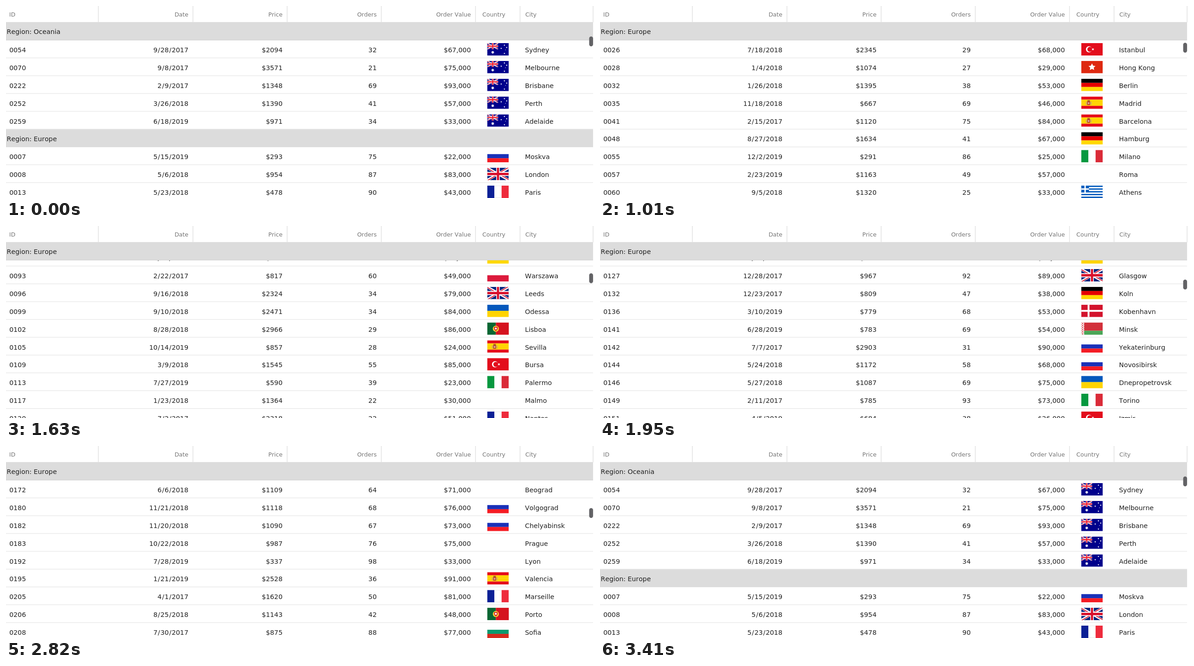
An HTML page that plays this animation: 1280x419 px, repeating every 5140 ms.

```html
<!DOCTYPE html>
<html lang="en">
<head>
<meta charset="utf-8">
<title>Grouped order grid</title>
<style>
  html, body { margin: 0; width: 100%; height: 100%; overflow: hidden; background: #fff; }
  svg { display: block; }
  text { font: 14.25px "DejaVu Sans", Verdana, sans-serif; font-kerning: none; fill: #212121; }
  .head text { font-size: 12.6px; fill: #757575; }
  .end { text-anchor: end; }
</style>
</head>
<body>
<svg id="stage" width="1280" height="419" viewBox="0 0 1280 419">
  <defs id="defs">
    <clipPath id="view"><rect y="74.9" width="1280" height="345"/></clipPath>
    <clipPath id="pinwheel"><path d="M30 15h30v15zv15h-30zh-30v-15zv-15h30z"/></clipPath>
  </defs>
  <g clip-path="url(#view)"><g id="list"></g></g>
  <g class="head" id="head"></g>
  <rect y="36" width="1278" height="38.9" fill="#dcdcdc"/>
  <rect y="74" width="1278" height="1" fill="#d0d0d0"/>
  <text id="pinned" x="1.5" y="61.3"></text>
  <rect id="thumb" x="1269.5" y="66.5" width="8.5" height="21.5" rx="4.2" fill="#636366"/>
</svg>
<script>
const LOOP = 5140, ROW = 38.87, TOP = 74.9, NOTCH = ROW * 10 / 3, THUMB_STEP = 4.6;
const $ = id => document.getElementById(id);

// ---- flags, drawn in a 47 x 27 box ----
const W = 47, H = 27;
const box = (x, y, w, h, c) => `<rect x="${x}" y="${y}" width="${w}" height="${h}" fill="${c}"/>`;
const dot = (x, y, r, c) => `<circle cx="${x}" cy="${y}" r="${r}" fill="${c}"/>`;
const line = (d, c, w, more = '') => `<path d="${d}" stroke="${c}" stroke-width="${w}" fill="none" ${more}/>`;
const rows = (...cs) => cs.map((c, i) => box(0, i * H / cs.length, W, H / cs.length, c)).join('');
const cols = (...cs) => cs.map((c, i) => box(i * W / cs.length, 0, W / cs.length, H, c)).join('');
const cross = (bg, c, x, w) => box(0, 0, W, H, bg) + box(x, 0, w, H, c) + box(0, (H - w) / 2, W, w, c);

function star(x, y, r, n, inner, c = '#fff') {
  const pts = Array.from({ length: n * 2 }, (_, i) => {
    const a = Math.PI * (i / n - .5), q = i % 2 ? r * inner : r;
    return (x + q * Math.cos(a)).toFixed(2) + ',' + (y + q * Math.sin(a)).toFixed(2);
  });
  return `<polygon points="${pts.join(' ')}" fill="${c}"/>`;
}

function jack(w, h, blue, red) {
  const diag = 'M0 0L60 30M60 0L0 30', plus = 'M30 0V30M0 15H60';
  return `<svg width="${w}" height="${h}" viewBox="0 0 60 30" preserveAspectRatio="none">` +
    box(0, 0, 60, 30, blue) + line(diag, '#fff', 6) + line(diag, red, 4, 'clip-path="url(#pinwheel)"') +
    line(plus, '#fff', 10) + line(plus, red, 6) + '</svg>';
}

function greek() {
  const blue = '#0a5fbe', stripes = Array.from({ length: 9 }, (_, i) => i % 2 ? '#fff' : blue);
  return rows(...stripes) + box(0, 0, 17, 15, blue) + box(7, 0, 3, 15, '#fff') + box(0, 6, 17, 3, '#fff');
}

function belarus() {
  let out = box(0, 0, W, 18, '#d2303a') + box(0, 18, W, 9, '#4aa657') + box(0, 0, 6.5, H, '#fff');
  for (let y = 0; y < 6; y++)
    out += star(3.2, 2.3 + y * 4.5, 2.1, 4, .5, '#d2303a') + dot(.8, y * 4.5, .8, '#d2303a') + dot(5.6, y * 4.5, .8, '#d2303a');
  return out;
}

const flags = {
  au: box(0, 0, W, H, '#00008b') + jack(24, 13.5, '#00008b', '#f01c2c') + star(12, 20, 3.8, 7, .5) +
    star(37.5, 4.5, 1.8, 7, .5) + star(30.5, 11.5, 1.8, 7, .5) + star(42.5, 9.5, 1.8, 7, .5) +
    star(37.5, 22.5, 1.8, 7, .5) + star(39.8, 14.8, 1, 5, .5),
  gb: jack(W, H, '#00247d', '#d8102c'),
  ru: rows('#fff', '#1a31b8', '#f51c24'),
  fr: cols('#0b2096', '#fff', '#ee2b3c') + line('M15.7 .5H31.3M15.7 26.5H31.3', '#e8e8e8', 1),
  it: cols('#06983f', '#fff', '#da2b38'),
  be: cols('#000', '#fde04a', '#f02c3c'),
  de: rows('#000', '#e50000', '#ffd800'),
  ua: rows('#0458bc', '#ffd400'),
  pl: rows('#fff', '#dc1a3c'),
  hu: rows('#da2b38', '#fff', '#07915b'),
  bg: rows('#fff', '#0a9a6f', '#d62a1e'),
  dk: cross('#d3132c', '#fff', 14, 4),
  se: cross('#0a6cab', '#fdd100', 14.8, 5.6),
  gr: greek(),
  by: belarus(),
  hk: box(0, 0, W, H, '#de2910') + star(23.5, 13.5, 8, 5, .5),
  tr: box(0, 0, W, H, '#e30d1c') + dot(17, 13.5, 6.7, '#fff') + dot(18.8, 13.5, 5.4, '#e30d1c') + star(25.5, 13.5, 3.2, 5, .4),
  rs: rows('#f5182a', '#0a2ea8', '#fff') + box(11.5, 3, 7.5, 4, '#d9a441') +
    '<path d="M10 7.5H20.5V17Q20 21 15.2 23.5Q10.5 21 10 17Z" fill="#d5303a" stroke="#f3d9d4" stroke-width=".7"/>' +
    line('M12.2 9.5V17M18.3 9.5V17M15.2 9V21', '#f6e6e4', 1.5) + box(14, 12.5, 2.5, 4, '#d5303a'),
  es: rows('#e50d1b', '#ffd400', '#ffd400', '#e50d1b') + box(10.5, 11, 1.5, 7, '#b9a08a') +
    box(20.5, 11, 1.5, 7, '#b9a08a') + box(13, 10.5, 6.4, 8, '#b5402a') + box(14.5, 12.5, 3.4, 4, '#d9a6a0') +
    box(13.5, 8, 5.4, 2.5, '#a8582a'),
  pt: box(0, 0, 18.8, H, '#0a6633') + box(18.8, 0, 29, H, '#d5131f') + dot(18.8, 13.5, 6.6, '#f2d13a') +
    '<path d="M15 9.5H22.6V14Q22 17 18.8 18.5Q15.6 17 15 14Z" fill="#d5131f"/>' + dot(18.8, 13.2, 2.2, '#fff')
};
for (const k in flags)
  $('defs').innerHTML += `<symbol id="${k}" viewBox="0 0 ${W} ${H}" preserveAspectRatio="none">${flags[k]}</symbol>`;

// ---- data: short records get seeded figures ----
const data = `Region: Oceania
0054 9/28/2017 2094 32 67 au Sydney
0070 9/8/2017 3571 21 75 au Melbourne
0222 2/9/2017 1348 69 93 au Brisbane
0252 3/26/2018 1390 41 57 au Perth
0259 6/18/2019 971 34 33 au Adelaide
Region: Europe
0007 5/15/2019 293 75 22 ru Moskva
0008 5/6/2018 954 87 83 gb London
0013 5/23/2018 478 90 43 fr Paris
0025 6/22/2019 2059 34 70 ru Saint Petersburg
0026 7/18/2018 2345 29 68 tr Istanbul
0028 1/4/2018 1074 27 29 hk Hong Kong
0032 de Berlin
0035 es Madrid
0041 es Barcelona
0048 de Hamburg
0055 it Milano
0057 2/23/2019 1163 49 57 it Roma
0060 9/5/2018 1320 25 33 gr Athens
0068 2/12/2018 386 88 34 ua Kiev
0069 3/5/2018 381 63 24 it Napoli
0073 11/28/2018 730 89 65 gb Manchester
0077 4/16/2017 649 74 48 gb Birmingham
0081 7/7/2019 1152 33 38 hu Budapest
0085 10/27/2018 400 95 38 tr Ankara
0087 10/8/2018 857 91 78 be Bruxelles
0090 de Munchen
0093 pl Warszawa
0096 gb Leeds
0099 ua Odessa
0102 pt Lisboa
0105 es Sevilla
0109 tr Bursa
0113 it Palermo
0117 se Malmo
0120 fr Nantes
0124 ua Kharkov
0127 12/28/2017 967 92 89 gb Glasgow
0132 12/23/2017 809 47 38 de Koln
0136 3/10/2019 779 68 53 dk Kobenhavn
0141 6/28/2019 783 69 54 by Minsk
0142 7/7/2017 2903 31 90 ru Yekaterinburg
0144 5/24/2018 1172 58 68 ru Novosibirsk
0146 5/27/2018 1087 69 75 ua Dnepropetrovsk
0149 2/11/2017 785 93 73 it Torino
0151 4/5/2019 684 38 26 tr Izmir
0153 gb Sheffield
0155 12/13/2018 1211 71 86 gb Liverpool
0156 4/26/2017 1387 62 86 ru Samara
0168 3/21/2017 1500 20 30 se Stockholm
0172 6/6/2018 1109 64 71 rs Beograd
0180 11/21/2018 1118 68 76 ru Volgograd
0182 11/20/2018 1090 67 73 ru Chelyabinsk
0183 10/22/2018 987 76 75 hu Prague
0192 7/28/2019 337 98 33 fr Lyon
0195 1/21/2019 2528 36 91 es Valencia
0205 4/1/2017 1620 50 81 fr Marseille
0206 8/25/2018 1143 42 48 pt Porto
0208 7/30/2017 875 88 77 bg Sofia
0211 se Goteborg
0214 ru Kazan
0218 de Dresden
0224 it Genova
0229 be Gent
0233 bg Varna
0238 es Bilbao
0241 fr Lille`.split('\n');

let seed = 7;
const pick = (lo, hi) => {
  seed = seed * 16807 % 2147483647;
  return lo + seed % (hi - lo + 1);
};
function figures() {
  const orders = pick(20, 98), value = pick(22, 93);
  return [`${pick(1, 12)}/${pick(1, 28)}/${pick(2017, 2019)}`, Math.round(value * 1000 / orders), orders, value];
}

// ---- grid ----
const label = (x, y, s, end) => `<text x="${x}" y="${y}"${end ? ' class="end"' : ''}>${s}</text>`;
const slash = '<tspan dx=".8" letter-spacing=".8">/</tspan>';
const rule = y => box(0, y - 1, 1278, 1, '#e0e0e0');

function record(text, i) {
  const y = TOP + (i - 1) * ROW;
  if (text.startsWith('Region'))
    return box(0, y, 1278, ROW, '#dcdcdc') + label(1.5, y + 25.4, text);
  const f = text.split(' ');
  if (!f[1].includes('/')) f.splice(1, 0, ...figures());
  const [id, date, price, orders, value, flag, ...city] = f, base = y + 26.2;
  return label(7.2, base, id) + label(397, base, date.split('/').join(slash), true) +
    label(602, base, '$' + price, true) + label(807, base, orders, true) +
    label(1012, base, `$${value},000`, true) + label(1129.8, base, city.join(' ')) +
    `<use href="#${flag}" data-row="${i}" x="1047.5" y="${y + 6.1}" width="47" height="27"/>` + rule(y + ROW);
}
$('list').innerHTML = data.map(record).join('');

$('head').innerHTML = box(0, 0, 1280, 36, '#fff') + rule(36) +
  [201, 407, 612, 817, 1022, 1119, 1278].map(x => box(x - .7, 0, 1.4, 35.5, '#e0e0e0')).join('') +
  label(7, 23.2, 'ID') + label(397, 23.2, 'Date', true) + label(602, 23.2, 'Price', true) +
  label(807, 23.2, 'Orders', true) + label(1012, 23.2, 'Order Value', true) +
  label(1037, 23.2, 'Country') + label(1130.4, 23.2, 'City');

// ---- motion: time, wheel notches, rows whose flag is still loading ----
const steps = [
  [0, 0],
  [760, 1, 11, 12], [820, 1], [870, 2, 14, 15], [920, 2], [980, 3, 18], [1040, 3],
  [1100, 4, 22], [1160, 5, 24, 25], [1220, 5], [1270, 6, 29], [1330, 6],
  [1520, 7, 31, 32], [1570, 7], [1615, 8, 35], [1665, 8], [1710, 9, 37, 38], [1760, 9],
  [1805, 10, 40, 41], [1855, 10], [1900, 11, 45], [1950, 11],
  [2140, 12, 47, 48], [2190, 12], [2245, 13, 51], [2300, 13], [2350, 14, 54, 55, 56], [2390, 14],
  [2430, 15, 58, 59], [2470, 15],
  [2620, 16, 61, 62], [2670, 16], [2720, 17, 64, 65], [2770, 17], [2820, 15, 51, 54, 55],
  [2910, 13, 45, 48], [3040, 11, 38, 40],
  [3170, 8, 29, 31], [3230, 6, 22, 24], [3290, 4, 15, 17], [3350, 2, 8, 11], [3410, 0]
];
const flagNodes = [...document.querySelectorAll('use')];
let shown;

function draw(t) {
  const step = steps.findLast(s => s[0] <= t);
  if (step === shown) return;
  shown = step;
  const [, notch, ...loading] = step;
  $('list').setAttribute('transform', `translate(0 ${-notch * NOTCH})`);
  $('thumb').setAttribute('y', 66.5 + notch * THUMB_STEP);
  $('pinned').textContent = notch < 2 ? data[0] : data[6];
  for (const n of flagNodes)
    n.setAttribute('visibility', loading.includes(+n.dataset.row) ? 'hidden' : 'visible');
}

const start = performance.now();
(function tick() {
  draw((performance.now() - start) % LOOP);
  requestAnimationFrame(tick);
})();
</script>
</body>
</html>
```
